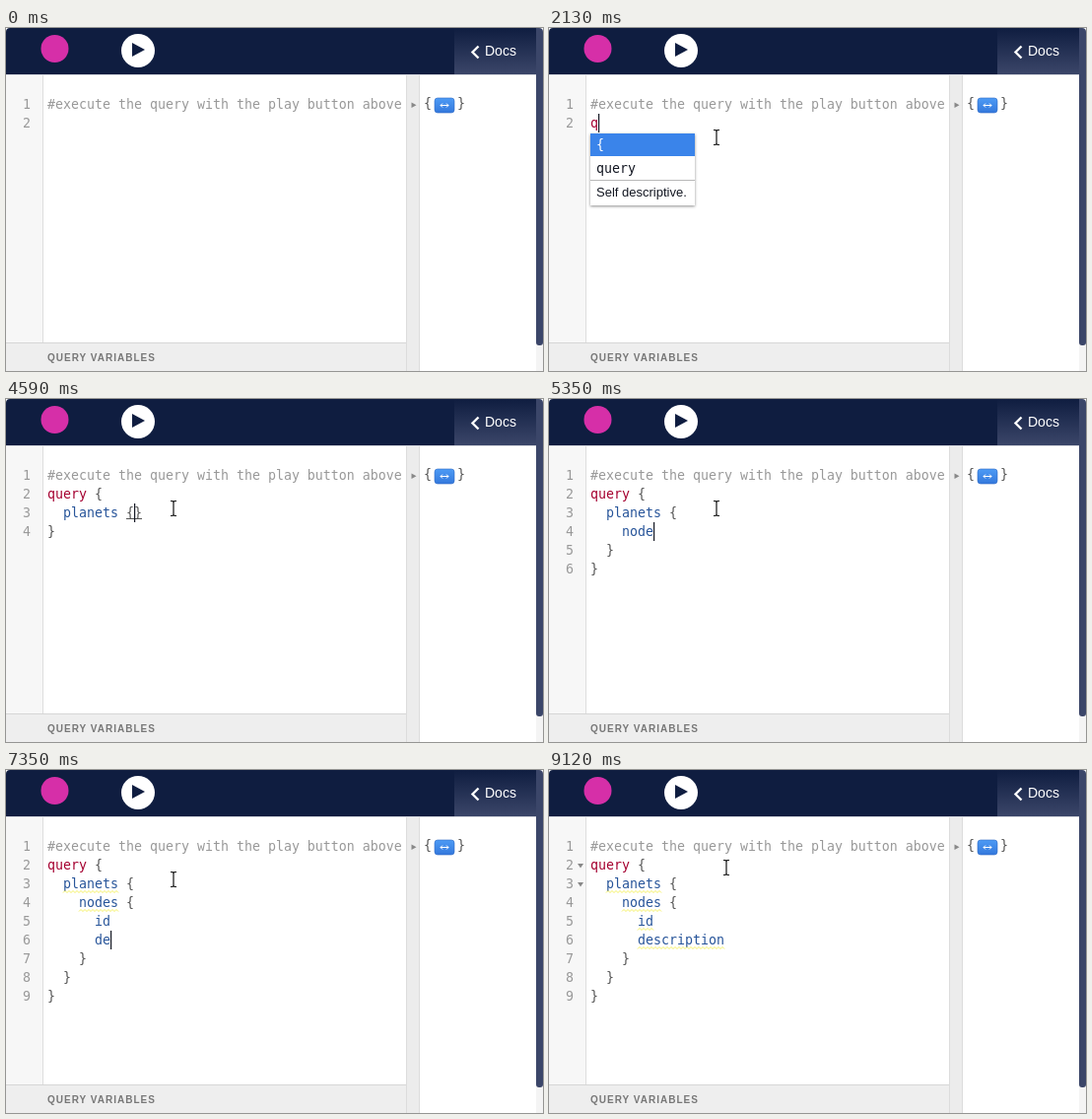
An HTML page that plays this animation: 545x348 px, repeating every 9.41 s.

```html
<!DOCTYPE html>
<html lang="en">
<head>
<meta charset="utf-8">
<title>Query editor</title>
<style>
  html, body { margin: 0; width: 100%; height: 100%; overflow: hidden; background: #fff; }
  svg { display: block; width: 100%; height: 100%; }
  text { font: 13px "Liberation Sans", Arial, sans-serif; white-space: pre; }
  .code { font: 13.29px "DejaVu Sans Mono", monospace; fill: #555; }
  .num { text-anchor: end; fill: #999; }
  .comment { fill: #999; }
  .keyword { fill: #a50030; }
  .field { fill: #28559a; }
  .popup { filter: drop-shadow(0 1px 1.5px rgba(0, 0, 0, .45)); }
</style>
</head>
<body>
<svg viewBox="0 0 545 348">
  <defs>
    <linearGradient id="tab" x2="0" y2="1">
      <stop stop-color="#0f1d40"/><stop offset="1" stop-color="#3b4669"/>
    </linearGradient>
    <linearGradient id="pill" x2="0" y2="1">
      <stop stop-color="#4d9bf5"/><stop offset="1" stop-color="#3478dc"/>
    </linearGradient>
  </defs>

  <path d="M0 47V4Q0 0 4 0H541V47Z" fill="#0f1d40"/>
  <circle cx="49.5" cy="21" r="14" fill="#d62fa8"/>
  <circle cx="134" cy="23" r="17" fill="#fff"/>
  <path d="M128 15L141 22L128 29Z" fill="#0f1d40"/>
  <rect x="455" width="83" height="47" fill="url(#tab)"/>
  <path d="M479.5 18.5L473.5 24.5L479.5 30.5" fill="none" stroke="#fff" stroke-width="2.4"/>
  <text x="486" y="28" style="font-size:14px" fill="#fff">Docs</text>
  <path d="M538 47H545V348H538Z" fill="#f4f4f4"/>
  <path d="M538 0H541Q545 0 545 4V319Q545 322 542 322H541Q538 322 538 319Z" fill="#3b4669"/>

  <path d="M0 47H37V320H0Z" fill="#f7f7f7"/>
  <path d="M37.5 47V320" stroke="#ddd"/>
  <path d="M0 320H406V348H0Z" fill="#eee"/>
  <path d="M0 319.5H406" stroke="#d6d6d6"/>
  <text x="42" y="338" style="font-size:10px;font-weight:bold;letter-spacing:1px" fill="#777">QUERY VARIABLES</text>
  <path d="M406 47H420V348H406Z" fill="#ececec"/>
  <path d="M406.5 47V348M419.5 47V348" stroke="#dcdcdc"/>
  <path d="M0 47.5H538" stroke="#d5d7de"/>

  <path d="M411.5 75.5L416.5 78.2L411.5 81Z" fill="#888"/>
  <text class="code" x="424" y="81">{</text>
  <rect x="435" y="71" width="20" height="15" rx="3" fill="url(#pill)" stroke="#2f6bc4" stroke-width=".6"/>
  <path d="M441 78.5H449M443 76.5L441 78.5L443 80.5M447 76.5L449 78.5L447 80.5" fill="none" stroke="#fff"/>
  <text class="code" x="458" y="81">}</text>

  <g id="editor"></g>
  <g id="mouse" fill="none">
    <path id="beam" d="M-3 -7.5H-1L0 -6.5L1 -7.5H3M0 -6.5V6.5M-3 7.5H-1L0 6.5L1 7.5H3" stroke="#fff" stroke-width="2.6"/>
    <use href="#beam" style="stroke:#111"/>
    <path d="M-3 -7.5H-1L0 -6.5L1 -7.5H3M0 -6.5V6.5M-3 7.5H-1L0 6.5L1 7.5H3" stroke="#111" stroke-width="1.2"/>
  </g>
</svg>
<script>
const LOOP = 9410, LEFT = 42, TOP = 68, CHAR = 8, LINE = 19;
const BLINK = 530, POPUP_DELAY = 60;
const editor = document.getElementById('editor');
const mouse = document.getElementById('mouse');

// Typing runs: start, interval, keys. An entry with several letters is a picked completion.
const runs = [
  [1990, 0, 'q'], [2420, 90, 'uery '], [3070, 0, '{'], [3260, 0, '\n'],
  [3630, 110, 'planets'], [4400, 150, ' {'], [4670, 0, '\n'],
  [4870, 150, 'nodes'], [5600, 190, ' {'], [6000, 0, '\n'],
  [6270, 160, 'id'], [6800, 0, '\n'], [7030, 280, 'de'], [7510, 0, ['scription']]
];
const marks = [[5450, 'planets', 3], [6600, 'nodes', 4], [8010, 'id', 5], [8010, 'description', 6]];
const fields = [[], ['planets', '__type'], ['nodes', '__typename'], ['description', 'id', 'model']];
const types = { planets: 'PlanetConnection', description: 'String' };
const widths = { planets: 216, description: 147 };
const path = [
  [1190, 100, 98], [1740, 170, 111], [8470, 170, 111], [8650, 172, 72],
  [8750, 174, 83], [8890, 174, 83], [9120, 180, 99]
];

const depthOf = s => s.split('{').length - s.split('}').length;

function buildStates() {
  let before = '#execute the query with the play button above\n', after = '';
  const states = [{ t: 0, before, after }, { t: 1190, before, after, caret: true }];
  for (const [start, step, keys] of runs) {
    [...keys].forEach((key, i) => {
      before += key;
      if (key === '{') after = '}' + after;
      if (key === '\n') {
        const depth = depthOf(before);
        before += '  '.repeat(depth);
        if (after[0] === '}') after = '\n' + '  '.repeat(depth - 1) + after;
      }
      states.push({ t: start + i * step, before, after, caret: true, picked: key.length > 1 });
    });
  }
  return states;
}
const states = buildStates();

const lineTop = n => TOP + (n - 1) * LINE;
const text = (x, y, s, cls, fill = '') =>
  `<text class="${cls}" x="${x}" y="${y}"${fill && ` fill="${fill}"`}>${s}</text>`;
const rect = (x, y, w, h, fill) =>
  `<rect x="${x}" y="${y}" width="${w}" height="${h}" fill="${fill}"/>`;

function colour(line) {
  if (line[0] === '#') return `<tspan class="comment">${line}</tspan>`;
  return line.replace(/\w+/g, w =>
    `<tspan class="${'query'.startsWith(w) ? 'keyword' : 'field'}">${w}</tspan>`);
}

function squiggle(word, n) {
  const x = LEFT + 2 * CHAR * (n < 5 ? n - 2 : 3);
  const zigzag = 'l2 -2l2 2'.repeat(word.length * CHAR / 4);
  return `<path d="M${x} ${lineTop(n) + 18.5}${zigzag}" fill="none" stroke="#f4ee3c" stroke-opacity=".8"/>`;
}

function hintsFor(state) {
  const word = (state.before.match(/\w+$/) || [])[0];
  if (!word || state.picked) return [];
  const depth = depthOf(state.before);
  if (!depth) return word === 'q' ? ['{', 'query'] : [];
  if (word === 'd') return fields[3];
  return fields[depth].filter(f => f.includes(word))
    .sort((a, b) => b.startsWith(word) - a.startsWith(word));
}

function popup(hints, x, y) {
  const w = widths[hints[0]] || 106, h = 24 * hints.length;
  const type = types[hints[0]] ? `<tspan fill="#ca9800">${types[hints[0]]}</tspan> ` : '';
  return `<g class="popup">${rect(x, y, w, h + 25, '#fff')}</g>` +
    rect(x, y, w, 23, '#3a84ea') +
    hints.map((hint, i) =>
      `<g style="--c:${i ? '#141823' : '#fff'}"><text class="code" style="fill:var(--c)" x="${x + 6}" y="${y + 16 + 24 * i}">${hint}</text></g>`).join('') +
    rect(x, y + h - 1, w, 1, '#b8b8b8') +
    text(x + 6, y + h + 16, type + 'Self descriptive.', 'info', '#141823');
}

function drawEditor(t) {
  const state = states.filter(s => s.t <= t).pop();
  const { before, after } = state, age = t - state.t;
  const lines = (before + after).split('\n');
  const row = before.split('\n').length;
  const col = before.length - before.lastIndexOf('\n') - 1;
  const x = LEFT + col * CHAR, y = lineTop(row);

  let out = lines.map((line, i) => {
    const base = lineTop(i + 1) + 14;
    return text(25, base, i + 1, 'code num') + text(LEFT, base, colour(line), 'code');
  }).join('');
  for (const [from, word, n] of marks) if (t >= from) out += squiggle(word, n);
  if (t >= 8110) {
    for (const n of [2, 3]) {
      const cy = lineTop(n) + 8;
      out += `<path d="M29 ${cy}h6l-3 4.5z" fill="#888"/>`;
    }
  }
  if (before.endsWith('{') && after[0] === '}') out += rect(x - CHAR, y + 15, 2 * CHAR, 1, '#555');
  if (state.caret && Math.floor(age / BLINK) % 2 === 0) out += rect(x, y, 1.2, LINE, '#141823');

  const hints = hintsFor(state);
  if (hints.length && age >= POPUP_DELAY) {
    const word = before.match(/\w+$/)[0];
    out += popup(hints, x - word.length * CHAR, y + LINE + 1);
  }
  return out;
}

function mouseAt(t) {
  const i = path.findIndex(p => p[0] > t);
  if (i < 0) return path[path.length - 1].slice(1);
  const [t0, x0, y0] = path[i - 1], [t1, x1, y1] = path[i];
  const k = (t - t0) / (t1 - t0);
  return [x0 + (x1 - x0) * k, y0 + (y1 - y0) * k];
}

let shown = '';
function frame(now) {
  const t = now % LOOP;
  const out = drawEditor(t);
  if (out !== shown) editor.innerHTML = shown = out;
  mouse.style.display = t < path[0][0] ? 'none' : '';
  if (t >= path[0][0]) mouse.setAttribute('transform', `translate(${mouseAt(t)})`);
  requestAnimationFrame(frame);
}
frame(0);
</script>
</body>
</html>
```
